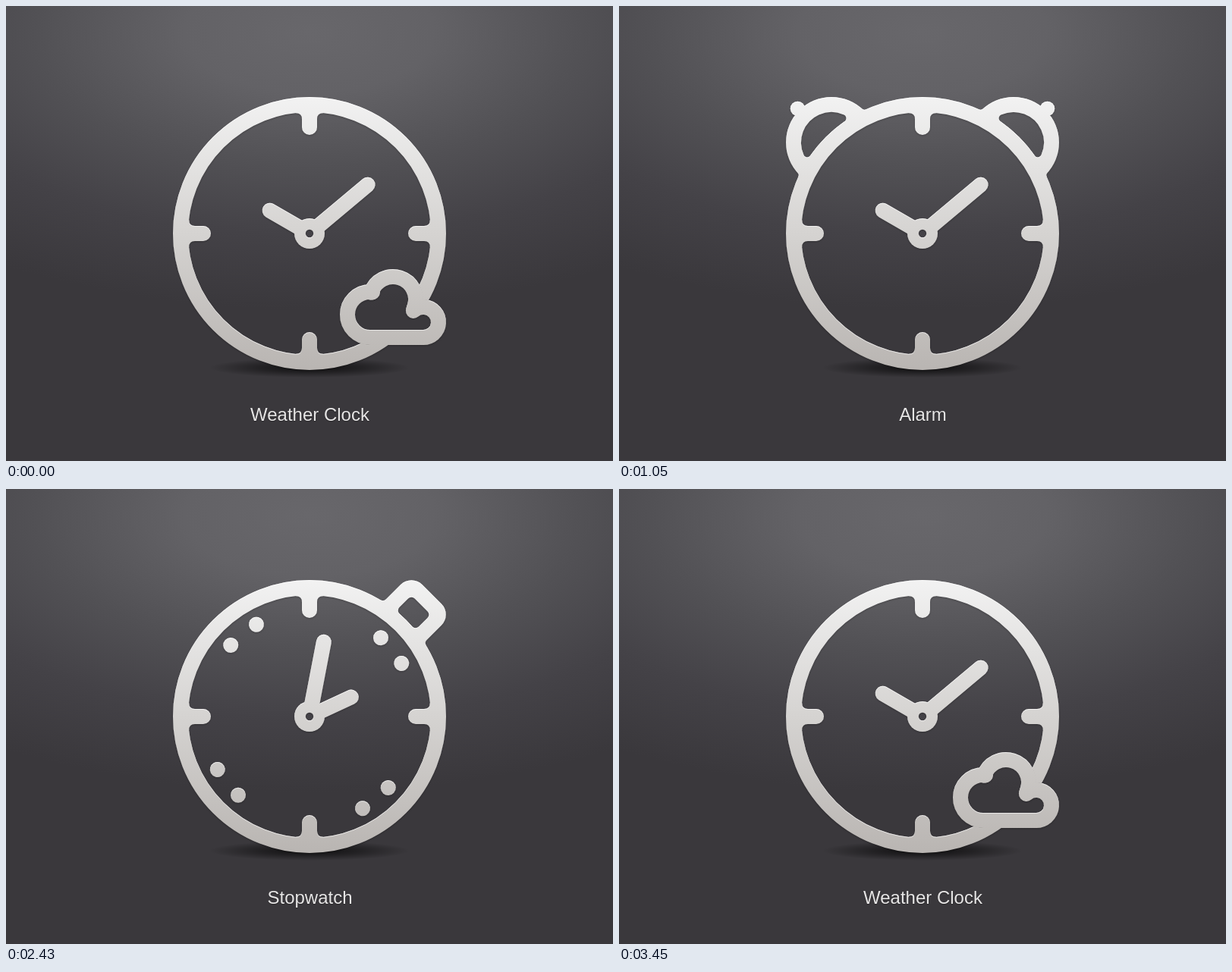
These frames come from a looping animation (800x600 px, 3600 ms). An HTML page with a canvas:

```html
<!DOCTYPE html>
<html lang="en">
<head>
<meta charset="utf-8">
<title>Clock icons</title>
<style>
  html, body { margin: 0; width: 100%; height: 100%; overflow: hidden; }
  body { background: #3a383c; }
  #stage {
    position: relative; width: 800px; height: 600px; overflow: hidden;
    background:
      radial-gradient(132px 13px at 400px 477px, rgba(0,0,0,.75), rgba(0,0,0,.4) 50%, transparent),
      radial-gradient(750px 365px at 400px 35px, #68676b, #636266 22%, #525155 48%, #444247 73%, #3a383c);
  }
  canvas { position: absolute; left: 0; top: 0; }
  #label {
    position: absolute; left: 0; top: 525px; width: 801px;
    font: 24px/27px "Liberation Sans", Arial, sans-serif;
    text-align: center; color: #e6e5e5; text-shadow: 0 1px 1px rgba(0,0,0,.35);
  }
</style>
</head>
<body>
<div id="stage">
  <canvas id="view" width="800" height="600"></canvas>
  <div id="label">Weather Clock</div>
</div>
<script>
const W = 800, H = 600, LOOP = 3600, STEP = 30, PART = 600, MOVE = 450, HALF = 225;
const LABELS = ["Weather Clock", "Alarm", "Alarm", "Stopwatch", "Stopwatch", "Weather Clock"];
const rad = deg => deg * Math.PI / 180;
const TAU = rad(360);

const label = document.getElementById("label");
const view = document.getElementById("view").getContext("2d");
const layer = () => Object.assign(document.createElement("canvas"), { width: W, height: H }).getContext("2d");
const art = layer(), edge = layer();

const metal = art.createLinearGradient(0, 120, 0, 480);
metal.addColorStop(0, "#f2f2f2");
metal.addColorStop(.5, "#d5d3d1");
metal.addColorStop(1, "#b9b5b2");

// cubic-bezier(.22, .75, .37, 1), clamped
function ease(x) {
  if (x <= 0) return 0;
  if (x >= 1) return 1;
  const curve = (s, a, b) => 3 * s * (1 - s) ** 2 * a + 3 * s * s * (1 - s) * b + s ** 3;
  let lo = 0, hi = 1;
  for (let i = 0; i < 24; i++) {
    const mid = (lo + hi) / 2;
    if (curve(mid, .22, .37) < x) lo = mid; else hi = mid;
  }
  return curve(lo, .75, 1);
}

function disc(x, y, r) {
  art.beginPath();
  art.arc(x, y, r, 0, TAU);
  art.fill();
}

function punch(draw) {
  art.globalCompositeOperation = "destination-out";
  draw();
  art.globalCompositeOperation = "source-over";
}

// Draws around the clock centre, turned by an angle in degrees
function turned(deg, draw) {
  art.save();
  art.translate(400, 300);
  art.rotate(rad(deg));
  draw();
  art.restore();
}

function fillet(a, corner, b) {
  for (const side of [-1, 1]) {
    art.beginPath();
    art.moveTo(a.x, a.y * side);
    art.quadraticCurveTo(corner.x, corner.y * side, b.x, b.y * side);
    art.lineTo(corner.x * .985, corner.y * side * .985);
    art.fill();
  }
}

// Where a circle R at the origin meets a circle r at (d, 0)
function meet(d, R, r) {
  const x = (d * d + R * R - r * r) / (2 * d);
  return Math.abs(x) < R ? { x, y: Math.sqrt(R * R - x * x) } : null;
}

function roundHole(width, path) {
  punch(() => {
    art.lineWidth = width;
    art.beginPath();
    path();
    art.closePath();
    art.fill();
    art.stroke();
  });
}

function ear(deg, p) {
  if (p <= 0) return;
  turned(deg, () => {
    const d = 107 + 62.7 * p;
    disc(d, 0, 60);
    const corner = meet(d, 180, 60), c = meet(d, 185, 65);
    if (corner && c) {
      fillet({ x: c.x * 180 / 185, y: c.y * 180 / 185 }, corner,
             { x: d + (c.x - d) * 60 / 65, y: c.y * 60 / 65 });
    }
    const tip = meet(d, 185, 35);
    if (tip) roundHole(10, () => {
      const a = Math.atan2(tip.y, tip.x - d), b = Math.atan2(tip.y, tip.x);
      art.arc(d, 0, 35, -a, a);
      art.arc(0, 0, 185, b, -b, true);
    });
    disc(d + 63, 0, 9.7);
  });
}

function button(p) {
  if (p <= 0) return;
  turned(-45, () => {
    const end = 175 + 53 * p;
    art.beginPath();
    art.roundRect(100, -38, end - 100, 76, 20);
    art.fill();
    if (end > 201) {
      fillet({ x: 174.9, y: 42.6 }, { x: 175.9, y: 38 }, { x: 180.7, y: 38 });
    }
    if (end > 212) roundHole(12, () => {
      const b = Math.asin(12 / 186);
      art.moveTo(end - 26, -12);
      art.lineTo(end - 26, 12);
      art.arc(0, 0, 186, b, -b, true);
    });
  });
}

function cloud(dx, front) {
  art.save();
  art.translate(dx, 0);
  if (front) punch(() => {
    disc(480, 407, 39.5);
    disc(510, 387, 39.5);
    disc(550, 417, 29.5);
    art.fillRect(480, 397, 70, 49.5);
  });
  art.lineWidth = 20;
  art.beginPath();
  art.arc(550, 417, 20, rad(229), rad(450));
  art.lineTo(480, 437);
  art.arc(480, 407, 30, rad(90), rad(276));
  art.stroke();
  art.beginPath();
  art.arc(510, 387, 30, rad(198), rad(384));
  art.stroke();
  art.restore();
}

function tick(deg) {
  turned(deg, () => {
    art.beginPath();
    art.moveTo(-18, -166);
    art.lineTo(-18, -158.8);
    art.quadraticCurveTo(-10, -158.8, -10, -151);
    art.lineTo(-10, -140);
    art.arc(0, -140, 10, rad(180), 0, true);
    art.lineTo(10, -151);
    art.quadraticCurveTo(10, -158.8, 18, -158.8);
    art.lineTo(18, -166);
    art.fill();
  });
}

function hand(deg, length) {
  turned(deg, () => {
    art.lineWidth = 20;
    art.beginPath();
    art.moveTo(0, 0);
    art.lineTo(0, -length);
    art.stroke();
  });
}

function clock(pose) {
  punch(() => disc(400, 300, 170));
  art.lineWidth = 20;
  art.beginPath();
  art.arc(400, 300, 170, 0, TAU);
  art.stroke();
  for (let q = 0; q < 360; q += 90) {
    tick(q);
    for (const a of pose.dots) turned(q + a, () => disc(0, -140, 10));
  }
  hand(50 * pose.hands, 100);
  hand(-360 + 300 * pose.hands, 60.5);
  disc(400, 300, 20);
  punch(() => disc(400, 300, 5.2));
}

// The cloud flies out in front of the clock and falls back behind it
function cloudAt(u) {
  const k = (u - HALF) / HALF;
  return { dx: 91 - (k < 0 ? 91 : 174) * k * k, front: k < 0 };
}

function poseAt(t) {
  const part = Math.floor(t / PART);
  const u = Math.min(t - part * PART, MOVE);
  const first = ease(u / HALF), second = ease((u - HALF) / HALF), whole = ease(u / MOVE);
  const pose = { part, left: 0, right: 0, button: 0, hands: 1, dots: [], cloud: null };
  const changes = [
    () => { if (u < MOVE) pose.cloud = cloudAt(u); },
    () => { pose.left = first; pose.right = second; },
    () => { pose.right = 1 - first; pose.left = 1 - second; pose.hands = 1 - whole; },
    () => { pose.button = first; pose.hands = 0; pose.dots = [30 * first, 30 * (first + second)]; },
    () => {
      pose.button = 1 - second;
      pose.hands = whole;
      if (u < MOVE) pose.dots = [30 + 30 * (first + second), 60 + 30 * second];
    },
    () => { if (u > 0) pose.cloud = cloudAt(MOVE - u); }
  ];
  changes[part]();
  return pose;
}

function tint(ctx, fill) {
  ctx.globalCompositeOperation = "source-in";
  ctx.fillStyle = fill;
  ctx.fillRect(0, 0, W, H);
  ctx.globalCompositeOperation = "source-over";
}

function paint(pose) {
  art.clearRect(0, 0, W, H);
  art.fillStyle = art.strokeStyle = "#fff";
  art.lineCap = art.lineJoin = "round";
  const c = pose.cloud;
  ear(-135, pose.left);
  ear(-45, pose.right);
  button(pose.button);
  if (c && !c.front) cloud(c.dx, false);
  clock(pose);
  if (c && c.front) cloud(c.dx, true);

  // Light along the upper edges
  edge.clearRect(0, 0, W, H);
  edge.drawImage(art.canvas, 0, 0);
  edge.globalCompositeOperation = "destination-out";
  edge.drawImage(art.canvas, 0, 1);
  tint(edge, "rgba(255,255,255,.65)");
  tint(art, metal);

  view.clearRect(0, 0, W, H);
  view.shadowColor = "rgba(0,0,0,.25)";
  view.shadowBlur = 2;
  view.shadowOffsetY = 1;
  view.drawImage(art.canvas, 0, 0);
  view.shadowColor = "transparent";
  view.drawImage(edge.canvas, 0, 0);
  if (label.textContent !== LABELS[pose.part]) label.textContent = LABELS[pose.part];
}

const start = performance.now();
let shown = -1;
function tickFrame() {
  const t = Math.floor((performance.now() - start) % LOOP / STEP) * STEP;
  if (t !== shown) paint(poseAt(shown = t));
  requestAnimationFrame(tickFrame);
}
tickFrame();
</script>
</body>
</html>
```
